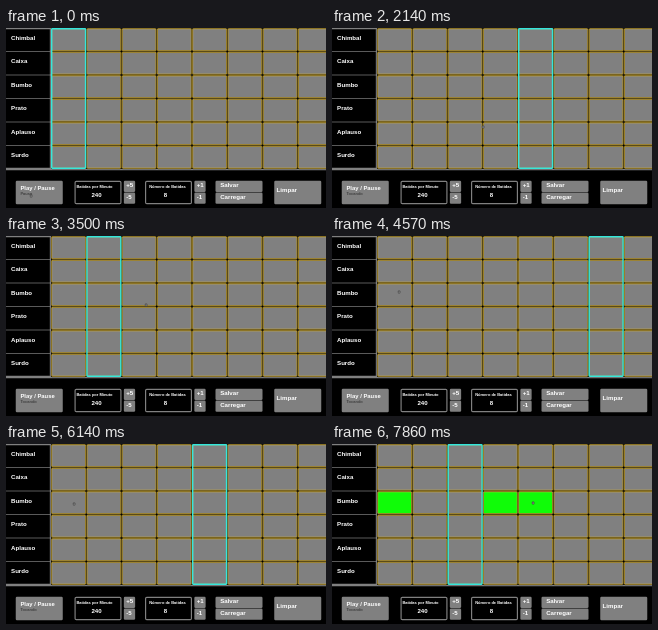
Recreate the animation shown at these times as an HTML page with a canvas. Size 320x180 px, loop 8 s.

```html
<!DOCTYPE html>
<html lang="pt">
<head>
<meta charset="utf-8">
<style>
html, body { margin: 0; width: 100%; height: 100%; overflow: hidden; background: #000; }
canvas { display: block; }
</style>
</head>
<body>
<canvas id="stage" width="320" height="180"></canvas>
<script>
const ctx = document.getElementById('stage').getContext('2d');
const GRAY = '#808080', GOLD = '#d4af37', GREEN = '#10fc08', CYAN = '#34e6dc';
const LOOP = 8000, START = 890, BEAT = 262;
const SCALE = 0.235, SHIFT = -2;
const instruments = ['Chimbal', 'Caixa', 'Bumbo', 'Prato', 'Aplauso', 'Surdo'];

// [time, row, column]
const clicks = [[6350, 2, 0], [7210, 2, 3], [7650, 2, 4]];

// [time, x, y] in stage pixels
const pointer = [
  [0, 25, 168], [1150, 25, 168], [1950, 140, 106], [2140, 151, 99], [2700, 151, 99],
  [3400, 140, 69], [3600, 140, 69], [4200, 67, 56], [4700, 67, 56], [6000, 68, 60],
  [6500, 68, 60], [7050, 183, 58], [7230, 183, 58], [7450, 201, 59], [8000, 201, 59]
];

function box(x, y, w, h, color, radius = 5) {
  ctx.fillStyle = color;
  ctx.beginPath();
  ctx.roundRect(x, y, w, h, radius);
  ctx.fill();
}

// Border drawn inside the rectangle
function ring(x, y, w, h, color, width = 5, radius = 5) {
  ctx.strokeStyle = color;
  ctx.lineWidth = width;
  ctx.beginPath();
  ctx.roundRect(x + width / 2, y + width / 2, w - width, h - width, radius);
  ctx.stroke();
}

function text(str, x, y, size = 26, color = '#fff') {
  ctx.font = `bold ${size}px "Liberation Sans", Arial, sans-serif`;
  ctx.fillStyle = color;
  ctx.fillText(str, x, y);
}

function drawGrid(t) {
  ring(0, 0, 200, 600, GRAY, 5, 0);
  ring(0, 600, 1400, 200, GRAY, 5, 0);
  instruments.forEach((name, row) => {
    const y = row * 100;
    text(name, 30, y + 51);
    ctx.fillStyle = GRAY;
    ctx.fillRect(0, y + 98.5, 200, 3);
    for (let col = 0; col < 8; col++) {
      const x = 200 + col * 150;
      const on = clicks.some(([at, r, c]) => t >= at && r === row && c === col);
      box(x + 4, y + 4, 142, 92, on ? GREEN : GRAY, 3);
      ring(x, y, 150, 100, GOLD);
      ring(x, y, 150, 100, '#000', 2);
    }
  });
  const beat = Math.max(0, Math.floor((t - START) / BEAT)) % 8;
  ring(200 + beat * 150, 0, 150, 600, CYAN, 6, 3);
}

function drawCounter(x, label, labelX, value, valueX, step) {
  ring(x, 650, 200, 100, GRAY);
  text(label, labelX, 679, 17);
  text(value, valueX, 720);
  box(x + 210, 650, 48, 48, GRAY);
  box(x + 210, 700, 48, 48, GRAY);
  text('+' + step, x + 220, 677);
  text('-' + step, x + 220, 728);
}

function drawControls(t) {
  box(50, 650, 200, 100, GRAY);
  text('Play / Pause', 70, 690, 25);
  text(t < START ? 'Pausa' : 'Tocando', 70, 712, 17, '#404040');
  drawCounter(300, 'Batidas por Minuto', 308, '240', 372, 5);
  drawCounter(600, 'Número de Batidas', 618, '8', 680, 1);
  box(900, 650, 200, 48, GRAY);
  text('Salvar', 920, 677);
  box(900, 700, 200, 48, GRAY);
  text('Carregar', 920, 728);
  box(1150, 650, 200, 100, GRAY);
  text('Limpar', 1160, 699);
}

function drawPointer(t) {
  const i = pointer.findIndex(p => p[0] > t);
  const [t0, x0, y0] = pointer[i - 1], [t1, x1, y1] = pointer[i];
  const k = (t - t0) / (t1 - t0), ease = k * k * (3 - 2 * k);
  const x = x0 + (x1 - x0) * ease, y = y0 + (y1 - y0) * ease;
  box(x - 1.2, y - 1.5, 2.6, 3, '#484848', 1);
  box(x - 0.5, y - 0.6, 1.2, 1.2, '#c8c8c8', 0.5);
}

function draw(now) {
  const t = now % LOOP;
  ctx.setTransform(1, 0, 0, 1, 0, 0);
  ctx.fillStyle = '#000';
  ctx.fillRect(0, 0, 320, 180);
  ctx.setTransform(SCALE, 0, 0, SCALE, SHIFT, 0);
  drawGrid(t);
  drawControls(t);
  ctx.setTransform(1, 0, 0, 1, 0, 0);
  drawPointer(t);
  requestAnimationFrame(draw);
}
requestAnimationFrame(draw);
</script>
</body>
</html>
```
